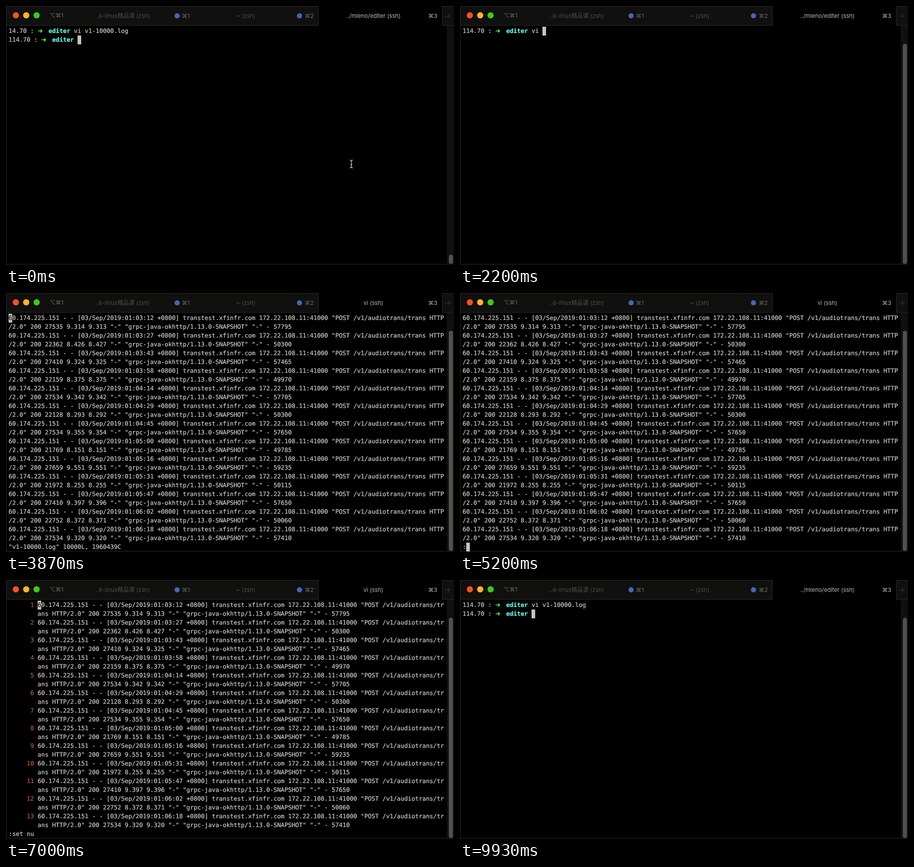
An HTML page that plays this animation: 864x500 px, repeating every 9990 ms.

```html
<!DOCTYPE html>
<html lang="en">
<head>
<meta charset="utf-8">
<title>Terminal</title>
<style>
html, body { margin: 0; width: 100%; height: 100%; overflow: hidden; background: #000; }
#stage { position: relative; width: 864px; height: 500px; overflow: hidden; background: #000; }
#stage svg { position: absolute; left: 0; top: 0; }
#chrome text { font: 11px Inter, "Noto Sans CJK SC", "DejaVu Sans", sans-serif; fill: #4c4c48; }
#chrome .mid { text-anchor: middle; }
#chrome .key { fill: #6c6c68; }
#chrome .on { fill: #b8b8b2; }
#term, #cursor {
  position: absolute; white-space: pre; color: #d0d0c8;
  font: 11.63px/17px "DejaVu Sans Mono", "Noto Sans Mono", monospace;
  text-rendering: geometricPrecision;
  -webkit-text-stroke: .2px;
}
#term { left: 5px; top: 40px; }
#term div { height: 17px; }
#cursor { width: 7px; height: 17px; background: #c4c4c0; color: #1c1c1a; }
.dir { color: #62fbe8; }
.arrow {
  display: inline-block; width: 7px; color: #5cf63e;
  font: bold 12px/12px "DejaVu Sans", sans-serif;
}
.nu { color: #c2621c; }
</style>
</head>
<body>
<div id="stage">
  <svg id="chrome" width="864" height="500">
    <path d="M0 0H864V38H0ZM850 38H864V500H850Z" fill="#10100f"/>
    <path d="M603 0H841V38H603Z" fill="#000"/>
    <path d="M0 .5H602M842 .5H864M.5 0V500M0 37.5H602.5V0M864 37.5H841.5V0M0 498.5H850" fill="none" stroke="#262622"/>
    <circle cx="19" cy="18" r="6" fill="#fc4f28"/>
    <circle cx="39" cy="18" r="6" fill="#fdb622"/>
    <circle cx="59" cy="18" r="6" fill="#3ecb18"/>
    <circle cx="330" cy="19" r="5" fill="#4567b8"/>
    <circle cx="566" cy="19" r="5" fill="#4567b8"/>
    <text class="key" x="84" y="22">⌥⌘1</text>
    <text class="mid" x="225" y="23">..6-linux精品课 (zsh)</text>
    <text class="key" x="339" y="23">⌘1</text>
    <text class="mid" x="462.5" y="23">~ (zsh)</text>
    <text class="key" x="576" y="23">⌘2</text>
    <text class="mid on" id="title" x="708.5" y="23"></text>
    <text class="on" x="814" y="23">⌘3</text>
    <path d="M848 19.5H858M853.5 15V24" stroke="#363632"/>
    <rect id="thumb" x="854" width="8" rx="4" fill="#50504c"/>
  </svg>
  <div id="term"></div>
  <div id="cursor"></div>
  <svg id="mouse" width="864" height="500">
    <path d="M663 297.5Q666 297.5 666 300V310Q666 312.5 663 312.5M669 297.5Q666 297.5 666 300M666 310Q666 312.5 669 312.5M664 306.5H668" fill="none" stroke="#d6d6cc" stroke-width="1.2"/>
  </svg>
</div>
<script>
const LOOP = 9990, COLS = 120, LAST_ROW = 26, GUTTER = 8, PROMPT_COLS = 19;
const MOUSE_HIDE = 800;
const el = id => document.getElementById(id);

// time, bytes in, two durations, bytes out
const entries = [
  "03:12 27535 9.314 9.313 57795", "03:27 22362 8.426 8.427 50300",
  "03:43 27410 9.324 9.325 57465", "03:58 22159 8.375 8.375 49970",
  "04:14 27534 9.342 9.342 57705", "04:29 22128 8.293 8.292 50300",
  "04:45 27534 9.355 9.354 57650", "05:00 21769 8.151 8.151 49785",
  "05:16 27659 9.551 9.551 59235", "05:31 21972 8.255 8.255 50115",
  "05:47 27410 9.397 9.396 57650", "06:02 22752 8.372 8.371 50060",
  "06:18 27534 9.320 9.320 57410"
];
const logs = entries.map(entry => {
  const [time, size, a, b, out] = entry.split(" ");
  return `60.174.225.151 - - [03/Sep/2019:01:${time} +0800] transtest.xfinfr.com ` +
    `172.22.108.11:41000 "POST /v1/audiotrans/trans HTTP/2.0" 200 ${size} ${a} ${b} ` +
    `"-" "grpc-java-okhttp/1.13.0-SNAPSHOT" "-" - ${out}`;
});

const prompt = (host, cmd = "") =>
  `${host} : <span class="arrow">➜</span>  <b class="dir">editer</b> ${cmd}`;

function shell(cmd, before = [], full = true) {
  return {
    title: "../mleno/editer (ssh)", thumb: full ? 73 : 480,
    rows: [...before, prompt("114.70", cmd)],
    col: PROMPT_COLS + cmd.length, row: before.length, char: ""
  };
}

function editor(status, numbered, typing) {
  const pad = numbered ? GUTTER : 0, width = COLS - pad;
  const rows = logs.flatMap((line, i) => {
    const nu = numbered ? `<span class="nu">${String(i + 1).padStart(7)} </span>` : "";
    return [nu + line.slice(0, width), " ".repeat(pad) + line.slice(width)];
  });
  const at = typing
    ? { col: status.length, row: LAST_ROW, char: "" }
    : { col: pad, row: 0, char: "6" };
  return { title: "vi (ssh)", thumb: 73, rows: [...rows, status], ...at };
}

const open = "vi v1-10000.log";
const steps = [
  [0, shell("", [prompt("14.70", open)], false)],
  [1070, shell("")],
  [1400, shell("v")],
  [1470, shell("vi")],
  [1530, shell("vi ")],
  [2670, shell("vi v")],
  [3070, shell("vi v1")],
  [3470, shell(open + " ")],
  [3800, editor('"v1-10000.log" 10000L, 1960439C', false, false)],
  [4930, editor(":", false, true)],
  [5800, editor(":s", false, true)],
  [5930, editor(":se", false, true)],
  [6070, editor(":set", false, true)],
  [6270, editor(":set ", false, true)],
  [6470, editor(":set n", false, true)],
  [6600, editor(":set nu", false, true)],
  [6870, editor(":set nu", true, false)],
  [8530, editor(":", true, true)],
  [8870, editor(":q", true, true)],
  [9530, shell("", [prompt("114.70", open)])]
];

let shown;
function show(s) {
  el("title").textContent = s.title;
  el("thumb").setAttribute("y", s.thumb);
  el("thumb").setAttribute("height", 498 - s.thumb);
  el("term").innerHTML = s.rows.map(row => `<div>${row}</div>`).join("");
  const cursor = el("cursor");
  cursor.style.left = 5 + s.col * 7 + "px";
  cursor.style.top = 40 + s.row * 17 + "px";
  cursor.textContent = s.char;
}

function draw() {
  const t = performance.now() % LOOP;
  const state = steps.filter(([start]) => start <= t).pop()[1];
  if (state !== shown) show(shown = state);
  el("mouse").style.display = t < MOUSE_HIDE ? "" : "none";
  requestAnimationFrame(draw);
}
draw();
</script>
</body>
</html>
```
